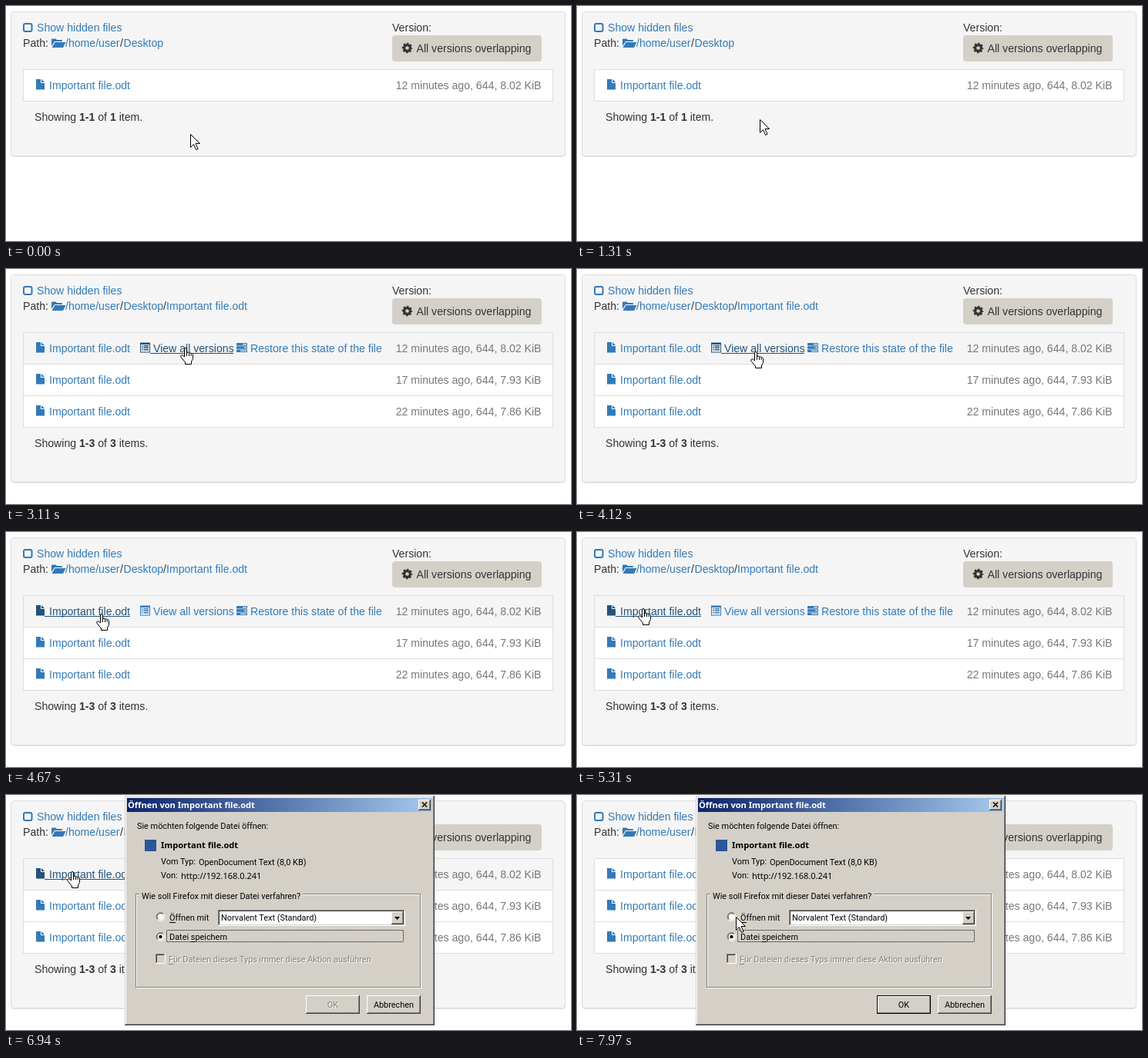
These frames come from a looping animation (733 by 305 pixels, 8 s). An HTML page:

```html
<!DOCTYPE html>
<html lang="en">
<head>
<meta charset="utf-8">
<title>File versions</title>
<style>
  html, body { margin: 0; width: 100%; height: 100%; overflow: hidden; background: #fff; }
  svg { display: block; width: 733px; height: 305px; }
  text { white-space: pre; }
  .page { font: 14.1px "Liberation Sans", Arial, sans-serif; fill: #333; }
  .page .muted { fill: #777; }
  .page .link { color: #337ab7; fill: currentColor; }
  .page .link.hot { color: #23527c; }
  .link .line { visibility: hidden; }
  .link.hot .line { visibility: inherit; }
  .bold { font-weight: bold; }
  .dialog { font: 10.9px Roboto, "Noto Sans", sans-serif; fill: #000; }
  .dialog .strong { font: bold 11.1px "Noto Sans", "Open Sans", sans-serif; }
  .dialog .address { font: 11px "Noto Sans", "Open Sans", sans-serif; }
  .crisp { shape-rendering: crispEdges; }
</style>
</head>
<body>
<svg id="stage" viewBox="0 0 733 305" xmlns="http://www.w3.org/2000/svg"></svg>
<script>
const LOOP = 8000, STEP = 80;
const LOADED = 3110, OPENED = 6860, FILLED = 6940, LEFT = 7330, ENABLED = 7890;
const FACE = '#d4d0c8', SHADE = '#808080', DARK = '#404040', WHITE = '#fff', BLACK = '#000';

// Basic shapes
const rect = (x, y, w, h, fill, more = '') =>
  `<rect x="${x}" y="${y}" width="${w}" height="${h}" fill="${fill}" ${more}/>`;
const text = (x, y, label, more = '') => `<text x="${x}" y="${y}" ${more}>${label}</text>`;
const stroke = (d, color, more = '') => `<path d="${d}" fill="none" stroke="${color}" ${more}/>`;
const group = (id, body, more = '') => `<g id="${id}" ${more}>${body}</g>`;

// Icons
const fileIcon = y => `<path d="M39 ${y}h6v5h5v8.500h-11zM46 ${y}l4 4h-4z"/>`;
const folderIcon = '<path d="M59 52V43.500q0-1 1-1h4.500l1.500 1.500h6q1 0 1 1V46H63zM63.500 47H77.500L74 54H59.500z"/>';
const listIcon = '<path fill-rule="evenodd" d="M174 95.500h13v13h-13zM175 98v9.500h11V98z"/>' +
  [99, 101.5, 104].map(y => `<path d="M176 ${y}h1.500v1.500h-1.500zM178.500 ${y}h6.500v1.500h-6.500z"/>`).join('');
const tasksIcon = [[96, 8], [100.3, 10], [104.6, 5]].map(([y, x]) =>
  `<rect x="299" y="${y}" width="14" height="3.500" rx=".6"/>` +
  rect(299 + x, y + 1.1, 13 - x, 1.2, '#f5f5f5')).join('');
const cogIcon = '<g fill="none" stroke="#333"><circle cx="520.500" cy="54.500" r="3.900" stroke-width="3.200"/>' +
  '<circle cx="520.500" cy="54.500" r="5.600" stroke-width="2.400" stroke-dasharray="2.400 1.998" stroke-dashoffset="1.200"/></g>';

// Page
const link = (id, icon, x, y, label, from, to) =>
  group(id, icon + text(x, y, label) + rect(from, y + 1, to - from, 1, 'currentColor', 'class="line crisp"'), 'class="link"');

const fileLink = (id, y) => link(id, fileIcon(y - 13), 56, y, 'Important file.odt', 50, 161);
const info = (y, label) => text(694.5, y, label, 'text-anchor="end" class="muted"');
const row = (id, y, fill) => rect(22.5, y + .5, 687, 41, fill, `id="${id}" stroke="#ddd"`);
const summary = (y, range, count, unit) => text(37, y,
  `Showing <tspan class="bold">${range}</tspan> of <tspan class="bold">${count}</tspan> ${unit}.`);

const page =
  rect(6.5, 8.5, 719, 187, 'none', 'id="shadow" rx="4" stroke="#000" stroke-opacity=".12"') +
  rect(6.5, 7.5, 719, 187, '#f5f5f5', 'id="panel" rx="4" stroke="#ddd"') +
  '<g class="link">' +
  rect(23, 23, 10.5, 10, 'none', 'rx="2" stroke="currentColor" stroke-width="2"') +
  text(40, 33, 'Show hidden files') + '</g>' +
  text(22, 53, 'Path:') +
  `<g class="link">${folderIcon}${text(77, 53, '/home/user')}${text(152.5, 53, 'Desktop')}</g>` + text(148, 53, '/') +
  text(501, 33, 'Version:') +
  rect(501, 38, 194, 34, FACE, 'rx="4"') + cogIcon + text(532.5, 60, 'All versions overlapping') +
  row('row', 82, WHITE) +
  fileLink('file', 108) + info(108, '12 minutes ago, 644, 8.02 KiB') +
  group('actions',
    link('view', listIcon, 191, 108, 'View all versions', 187, 295) +
    link('restore', tasksIcon, 317, 108, 'Restore this state of the file', 313, 490)) +
  group('single', summary(149, '1-1', 1, 'item')) +
  group('triple',
    text(204, 53, '/') + text(208, 53, 'Important file.odt', 'class="link"') +
    row('row2', 123, WHITE) + row('row3', 164, WHITE) +
    fileLink('file2', 149) + info(149, '17 minutes ago, 644, 7.93 KiB') +
    fileLink('file3', 190) + info(190, '22 minutes ago, 644, 7.86 KiB') +
    summary(231, '1-3', 3, 'items'));

// Dialog
const edge = (x, y, w, h, light, dark) =>
  stroke(`M${x + .5} ${y + h - 1}V${y + .5}H${x + w - 1}`, light) +
  stroke(`M${x} ${y + h - .5}H${x + w - .5}V${y}`, dark);
const box = (x, y, w, h, fill, a, b, c, d) => '<g class="crisp">' + rect(x, y, w, h, fill) +
  edge(x, y, w, h, a, b) + edge(x + 1, y + 1, w - 2, h - 2, c, d) + '</g>';
const raised = (x, y, w, h) => box(x, y, w, h, FACE, WHITE, DARK, FACE, SHADE);
const sunken = (x, y, w, h, fill) => box(x, y, w, h, fill, SHADE, WHITE, DARK, FACE);

const arc = (cx, cy, r, color, side) => {
  const a = r * Math.SQRT1_2;
  return stroke(`M${cx - a} ${cy + a}A${r} ${r} 0 0 ${side} ${cx + a} ${cy - a}`, color);
};
const radio = (x, y, on) => `<circle cx="${x}" cy="${y}" r="5" fill="#fff"/>` +
  arc(x, y, 5.5, SHADE, 1) + arc(x, y, 5.5, WHITE, 0) +
  arc(x, y, 4.5, DARK, 1) + arc(x, y, 4.5, FACE, 0) +
  (on ? `<circle cx="${x}" cy="${y}" r="2.200"/>` : '');
const faded = (x, y, label, more = '') =>
  text(x + 1, y + 1, label, `fill="${WHITE}" ${more}`) + text(x, y, label, `fill="${SHADE}" ${more}`);
const key = (x, y, w, fill = BLACK) => rect(x, y, w, 1, fill, 'class="crisp"');
const centered = 'text-anchor="middle"';

const frame = h => box(154, 1, 402, h, FACE, FACE, DARK, WHITE, SHADE);
const dialog =
  group('blank', frame(320)) + group('whole', frame(298)) +
  rect(157, 4, 396, 18, 'url(#bar)') +
  raised(535, 6, 16, 14) + stroke('M540 9.500l6 6M546 9.500l-6 6', BLACK, 'stroke-width="1.500"') +
  group('content',
    text(158, 17, 'Öffnen von Important file.odt', 'class="strong" fill="#fff"') +
    text(170, 44, 'Sie möchten folgende Datei öffnen:') +
    rect(180, 58, 15, 15, '#2b579a') +
    text(201, 69, 'Important file.odt', 'class="strong"') +
    text(201, 90, 'Vom Typ:') + text(250, 91, 'OpenDocument Text (8,0 KB)') +
    text(201, 108, 'Von:') + text(227, 109, 'http://192.168.0.241', 'class="address"') +
    '<g class="crisp">' +
    rect(169.5, 129.5, 369, 121, 'none', 'stroke="#fff"') +
    rect(168.5, 128.5, 369, 121, 'none', `stroke="${SHADE}"`) +
    rect(173, 127, 212, 5, FACE) + '</g>' +
    text(176, 135, 'Wie soll Firefox mit dieser Datei verfahren?') +
    radio(200.5, 158, false) + text(212, 163, 'Öffnen mit') + key(212, 165, 8) +
    sunken(275, 149, 243, 21, WHITE) + text(279, 163, 'Norvalent Text (Standard)') +
    raised(500, 151, 16, 17) + '<path d="M504 158h7l-3.500 4z"/>' +
    radio(200.5, 184, true) + text(212, 188, 'Datei speichern') + key(240, 190, 5) +
    rect(208.5, 175.5, 307, 15, 'none', 'stroke="#000" stroke-dasharray="1 1" stroke-dashoffset=".5"') +
    sunken(194, 206, 13, 13, FACE) +
    faded(211, 217, 'Für Dateien dieses Typs immer diese Aktion ausführen') + key(211, 219, 6, SHADE) +
    raised(468, 260, 70, 24) + text(503, 276, 'Abbrechen', centered) +
    group('okOff', raised(389, 260, 70, 24) + faded(424, 276, 'OK', centered)) +
    group('okOn', box(389, 260, 70, 24, FACE, BLACK, BLACK, WHITE, SHADE) + text(424, 276, 'OK', centered)));

// Pointers, drawn relative to their hot spots
const arrow = '<path d="M.5.5V17.500L4.500 13.500 7.500 20.500 10 19.500 7 12.500H12.500z" fill="#fff" stroke="#000"/>';
const hand = '<g transform="translate(-6 0)" stroke="#000">' +
  '<path fill="#fff" d="M5.500 12V2q0-1.500 1.500-1.500T8.500 2V7.200q0-1.200 1.500-1.200t1.500 1.500q0-1 1.300-.8t1.300 1.600q.2-.8 1.200-.5t1.200 1.700V14.500L14.500 18V21.500H6.500V19L1.200 12.800Q-.2 10.500 1.700 9.800 3.500 9.500 5.500 12z"/>' +
  '<path fill="none" d="M8.500 7v4M11.500 7.500V11M14.100 8.500V11"/></g>';

document.getElementById('stage').innerHTML =
  '<defs><linearGradient id="bar"><stop stop-color="#0a246a"/><stop offset="1" stop-color="#a6caf0"/></linearGradient></defs>' +
  group('page', page, 'class="page"') +
  group('dialog', dialog, 'class="dialog"') +
  group('pointer', group('arrow', arrow) + group('hand', hand));

const el = id => document.getElementById(id);
const show = (id, on) => el(id).style.visibility = on ? 'inherit' : 'hidden';

// Pointer moves: start, number of steps, end point, downward bend
const start = [239, 166];
const moves = [
  [1070, 11, 232, 103, 0],
  [1950, 1, 232, 102, 0],
  [4120, 1, 231, 107, 0],
  [4200, 5, 134, 107, 6],
  [4670, 2, 111, 105, 0],
  [4910, 3, 92, 101, 0],
  [5230, 2, 85, 99, 0],
  [LEFT, 9, 206, 158, 0]
];

function pointerAt(t) {
  let [x, y] = start;
  for (const [at, steps, toX, toY, bend] of moves) {
    if (t < at) break;
    const p = Math.min(1, (Math.floor((t - at) / STEP) + 1) / steps);
    const e = p * p * (3 - 2 * p);
    x += (toX - x) * e;
    y += (toY - y) * e + bend * Math.sin(Math.PI * p);
  }
  return [Math.round(x), Math.round(y)];
}

function draw(t) {
  const [x, y] = pointerAt(t);
  const active = t < LEFT;
  const onRow = active && y > 82 && y < 124;
  const onText = onRow && y > 94 && y < 112;
  const overFile = onText && x >= 39 && x <= 161;
  const overView = onText && x >= 174 && x <= 295;
  const loaded = t >= LOADED;
  const height = loaded ? 269 : 187;

  el('panel').setAttribute('height', height);
  el('shadow').setAttribute('height', height);
  el('row').setAttribute('fill', onRow ? '#f5f5f5' : WHITE);
  el('file').classList.toggle('hot', overFile);
  el('view').classList.toggle('hot', overView);
  show('actions', onRow);
  show('single', !loaded);
  show('triple', loaded);

  const opened = t >= OPENED, filled = t >= FILLED, enabled = t >= ENABLED;
  show('dialog', opened);
  show('blank', opened && !filled);
  show('whole', filled);
  show('content', filled);
  show('okOff', filled && !enabled);
  show('okOn', enabled);

  // "inherit" keeps hidden parents in charge
  show('hand', overFile || overView);
  show('arrow', !overFile && !overView);
  el('pointer').setAttribute('transform', `translate(${x} ${y})`);
}

function tick() {
  draw(performance.now() % LOOP);
  requestAnimationFrame(tick);
}
tick();
</script>
</body>
</html>
```
